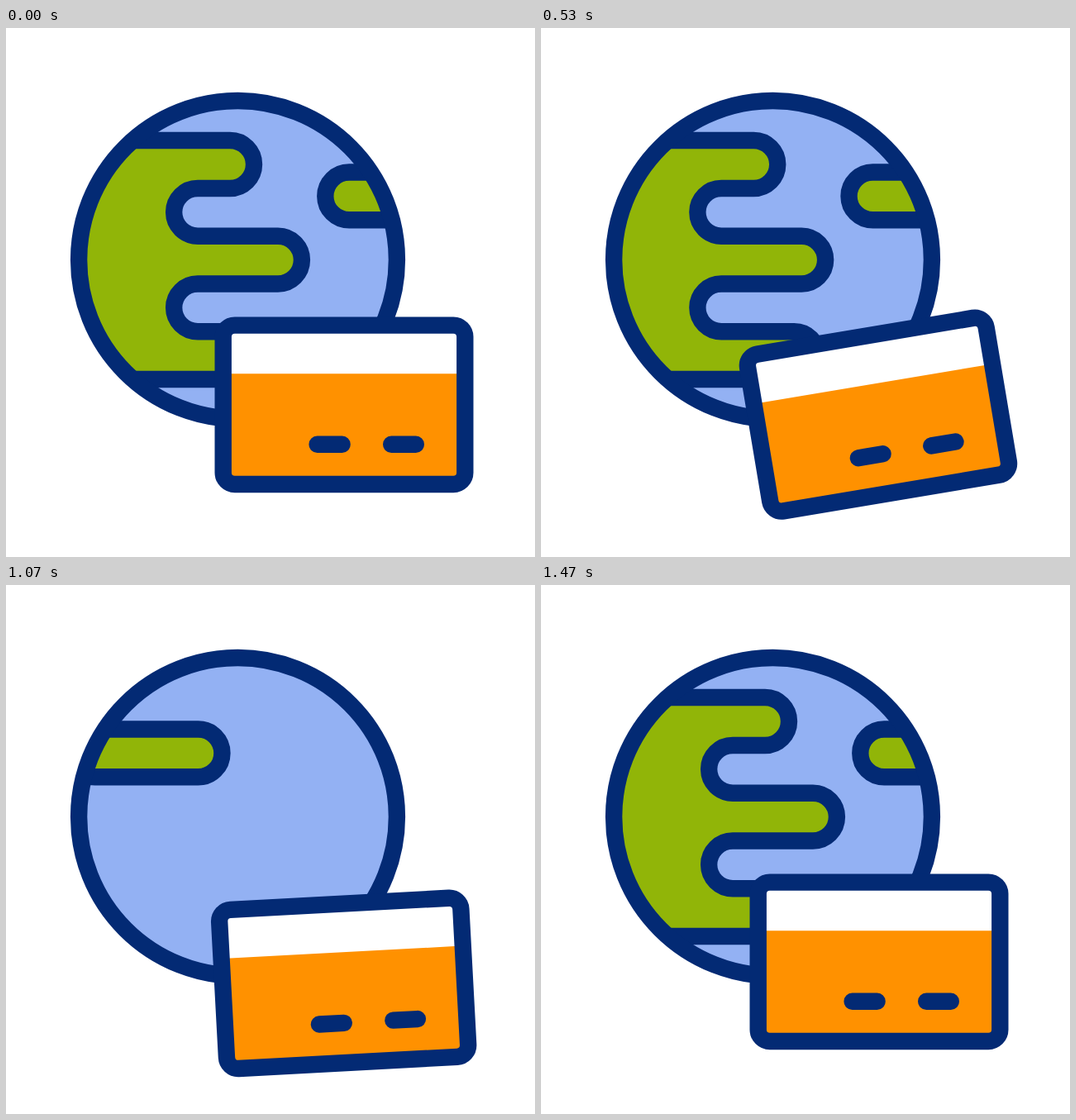
Recreate the animation shown at these times as an HTML page. Size 640 by 640 pixels, loop 2 s.

```html
<!DOCTYPE html>
<html lang="en">
<head>
<meta charset="utf-8">
<title>Globe and card</title>
<style>
  html, body { margin: 0; height: 100%; overflow: hidden; background: #fff; }
  svg { display: block; width: 100vw; height: 100vh; }
  .line { stroke: #032a74; stroke-width: 20.4; stroke-linecap: round; stroke-linejoin: round; }
</style>
</head>
<body>
<svg viewBox="0 0 640 640">
  <defs>
    <clipPath id="disc"><circle cx="280.5" cy="280.4" r="200"/></clipPath>
    <g id="land" class="line" fill="#91b508">
      <path d="M106 136H271a28 28 0 0 1 0 58H232a28 28 0 0 0 0 57.7H329a28 28 0 0 1 0 57.8H232
        a28 28 0 0 0 0 57.7H320a28 28 0 0 1 0 57.8H10a27 27 0 0 1 0-55.4H20a30 30 0 0 0 0-61.1H-29
        a31 31 0 0 1 0-64H20A42 42 0 0 0 62 202.5V180A44 44 0 0 1 106 136Z"/>
      <rect x="386.3" y="174.5" width="183" height="57.8" rx="28.9"/>
    </g>
  </defs>
  <circle cx="280.5" cy="280.4" r="192.4" fill="#93b1f3"/>
  <g clip-path="url(#disc)">
    <use id="near" href="#land"/>
    <use id="far" href="#land"/>
  </g>
  <circle class="line" cx="280.5" cy="280.4" r="192.4" fill="none"/>
  <g id="card">
    <rect x="-146" y="-96" width="292" height="192" rx="14" fill="#fff"/>
    <path d="M-140-37.5H140V92H-140Z" fill="#ff9100"/>
    <rect class="line" x="-146.3" y="-96.1" width="292.6" height="192.4" rx="14" fill="none"/>
    <path class="line" d="M-32.4 48H-2.4M57.2 48H86.8"/>
  </g>
</svg>
<script>
const LOOP = 2000, LAST = 44, BACK = -74.5, TURN = 1030.5;

// Cubic Bezier easing from (0,0) to (1,1) with flat handles at x = a and x = b.
function ease(x, a = 1 / 3, b = 2 / 3) {
  let low = 0, high = 1, u;
  for (let i = 0; i < 30; i++) {
    u = (low + high) / 2;
    const at = 3 * u * (1 - u) * ((1 - u) * a + u * b) + u ** 3;
    if (at < x) low = u; else high = u;
  }
  return u * u * (3 - 2 * u);
}

// Eases through [step, value] keys; 30 steps per second.
function track(keys, ...handles) {
  return step => {
    const next = Math.max(1, keys.findIndex(key => key[0] >= step));
    const [x0, y0] = keys[next - 1], [x1, y1] = keys[next];
    return y0 + (y1 - y0) * ease((step - x0) / (x1 - x0), ...handles);
  };
}

// The globe winds back a little, then makes one full turn.
const spin = track([[0, 0], [10, BACK], [LAST, TURN]], 0.455, 0.59);
const tilt = track([[0, 0], [10, -21.2], [24.2, 9.2], [34.2, -4.8], [LAST, 0]]);
const drop = track([[0, 0], [10, 25.3], [21.5, 0], [34, 28], [LAST, 0]]);

const [near, far, card] = ['near', 'far', 'card'].map(id => document.getElementById(id));

function draw(time) {
  const step = Math.min(LAST, Math.floor(time % LOOP * 0.03 + 0.15));
  const x = spin(step), angle = tilt(step);
  near.setAttribute('transform', `translate(${x})`);
  far.setAttribute('transform', `translate(${x - TURN})`);
  card.setAttribute('transform',
    `translate(${409 + angle / 9} ${455.7 + drop(step)}) rotate(${angle})`);
}

const start = performance.now();
function tick() {
  draw(performance.now() - start);
  requestAnimationFrame(tick);
}
tick();
</script>
</body>
</html>
```
